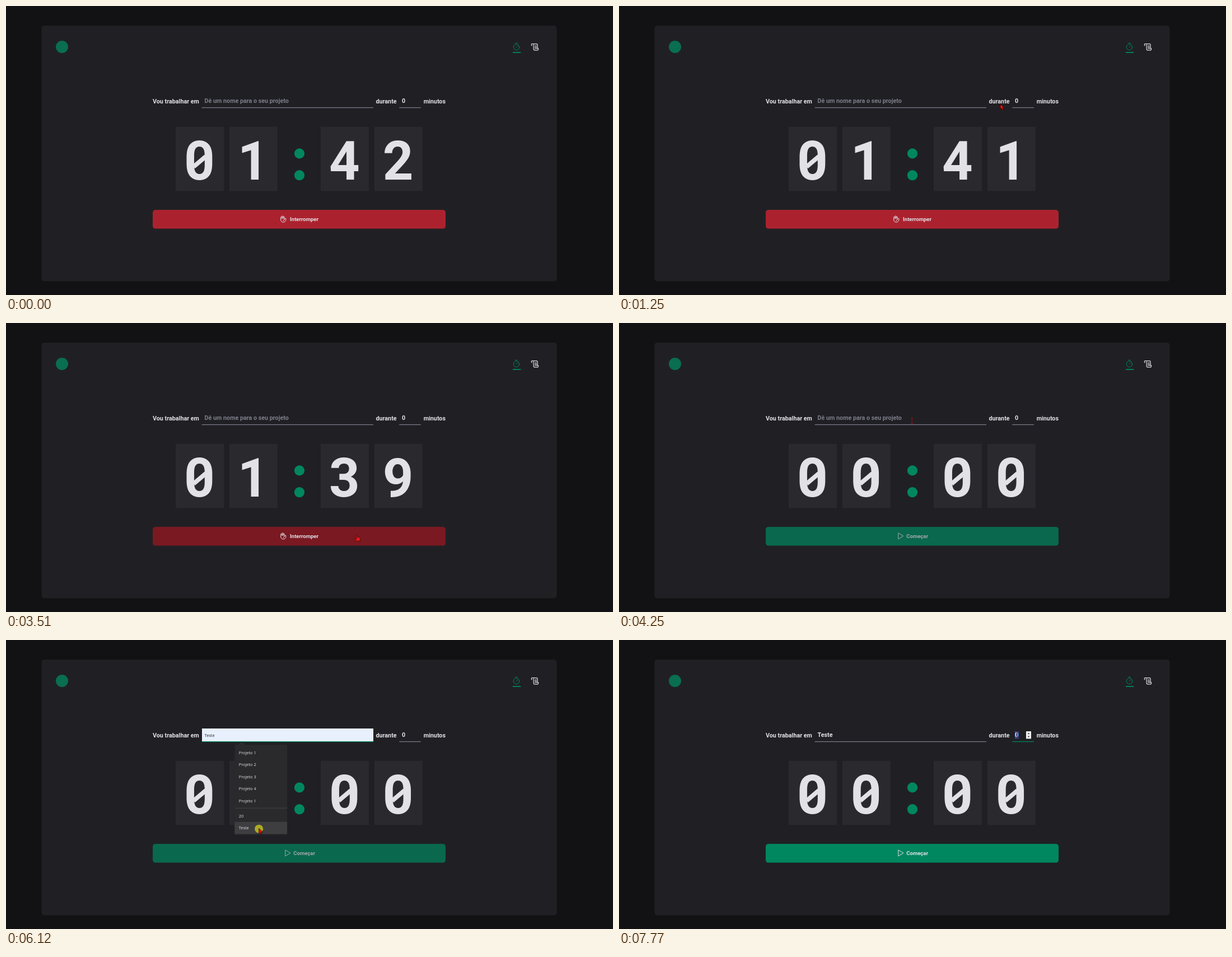
Recreate the animation shown at these times as an HTML page. Size 1084 by 516 pixels, loop 8000 ms.

```html
<!DOCTYPE html>
<html lang="pt-BR">
<meta charset="utf-8">
<title>Timer</title>
<style>
  html, body { margin: 0; width: 100%; height: 100%; overflow: hidden; background: #121214; }
  svg { display: block; width: 1084px; height: 516px; }
  text { font: 700 10.75px Roboto, sans-serif; fill: #e1e1e6; white-space: pre; }
  .icon { fill: none; stroke: #e1e1e6; stroke-linecap: round; stroke-linejoin: round; }
  .button text { font-size: 9.55px; }
  .digit text { font-size: 95.5px; text-anchor: middle; }
  .small text { font: 400 7.4px "Open Sans", sans-serif; }
</style>
<svg viewBox="0 0 1084 516">
  <rect x="63.5" y="35" width="920" height="456.5" rx="4.8" fill="#202024"/>
  <circle cx="100" cy="73" r="11" fill="#0a6e50"/>
  <g class="icon" style="stroke:#00875f">
    <circle cx="911.5" cy="73.4" r="5.2"/>
    <path d="M911.5 73.4l2.4-2.4M909.6 66.4h3.8"/>
  </g>
  <rect x="905" y="82" width="14.3" height="1.8" fill="#00875f"/>
  <path class="icon" stroke-width="1.2" d="M939.3 70.8a1.7 1.7 0 0 1 1.2-3.2h7q1.6 0 1.6 1.6v6.3M942.2 69v8.2q0 1.7 1.8 1.7h5.6q1.5-1 1-3.2h-6M944.5 71h2.8m-2.8 2.3h2.8"/>

  <text x="262" y="173.8">Vou trabalhar em</text>
  <text x="660.5" y="173.8">durante</text>
  <text x="745.7" y="173.8">minutos</text>
  <text id="name" x="354.6" y="173.1"></text>
  <g id="preview" class="small">
    <rect x="350" y="158" width="306" height="23.5" fill="#e8f0fe"/>
    <text id="previewText" x="354.6" y="172.6" style="fill:#222"></text>
  </g>
  <rect id="nameLine" x="349.7" y="180.9" width="306.3" height="1.2"/>
  <rect id="selection" x="706.8" y="163" width="7" height="13" fill="#1c55b0"/>
  <text x="707" y="173.1">0</text>
  <rect id="minutesLine" x="702.3" y="180.9" width="38.6" height="1.2"/>
  <g id="spinner">
    <rect x="727" y="163" width="9" height="13.3" fill="#f1f1f1"/>
    <path d="M729.5 168l2-2.5 2 2.5zm0 3.5l2 2.5 2-2.5z" fill="#444"/>
  </g>

  <g id="clock"></g>
  <g fill="#00875f"><circle cx="524" cy="263.4" r="9.1"/><circle cx="524" cy="302.2" r="9.1"/></g>

  <g id="stop" class="button">
    <rect id="stopFace" x="262" y="364" width="523" height="33.6" rx="4.8"/>
    <path class="icon" d="M490.6 381.5v-4.6q1.1-1.6 2.2 0v3-4.4q1.1-1.6 2.2 0v4-2.8q1.1-1.6 2.2 0v5q-2 .4-2.2 2M497.2 380.5q1-2 2.6-1v2a4.6 4.6 0 0 1-9.2 0"/>
    <text x="507" y="384">Interromper</text>
  </g>
  <g id="start" class="button">
    <rect x="262" y="364" width="523" height="33.6" rx="4.8" fill="#00875f"/>
    <path class="icon" d="M498.8 375.3v10.6l8.8-5.3z"/>
    <text x="513.3" y="384">Começar</text>
  </g>

  <g id="menu" class="small">
    <path d="M408.3 187.3h6.2l6.5-6 6.5 6h74.5v160.5h-93.7z" fill="#2a2a2d"/>
    <rect id="menuHover" x="408.3" width="93.7" height="21.6" fill="#3e3e40"/>
    <path d="M408.3 300.2h93.7" stroke="#444447"/>
  </g>

  <g id="pointer">
    <circle id="click" r="7.5" cy="1" fill="#d8d81c" opacity=".7"/>
    <path id="arrow" d="M0 0V9.2L2 7.4 3.6 11 5.4 10.2 3.9 6.8H6.8Z" fill="#e8150f" stroke="#180404" stroke-width=".7"/>
    <path id="hand" d="M-1 .8Q0-.6 1 .8V4.2Q6 4.5 5.8 7L5 11.5H-1L-4 7.6Q-4 6-1 7.4Z" fill="#e0181a" stroke="#3a0508" stroke-width=".7"/>
    <path id="beam" d="M-2.5-5h5M0-5V5M-2.5 5h5" stroke="#8a1220" stroke-width="1.2"/>
  </g>
</svg>
<script>
const $ = id => document.getElementById(id);
const LOOP = 8000, STOPPED = 3990, FOCUS = 4560, FILLED = 6190, MINUTES = 6980, SELECTED = 7700;
const GREEN = '#00875f', GRAY = '#7c7c8a', WHITE = '#e1e1e6';

// Pointer way points: time, x, y
const path = [
  [260, 1019, 504], [600, 745, 394], [1060, 618, 158], [1250, 681, 175],
  [1850, 539, 296], [2310, 715, 398], [2385, 765, 430], [2850, 1040, 514],
  [3110, 1036, 510], [3510, 627, 378], [3990, 606, 376], [4250, 523.5, 175],
  [FOCUS, 447, 172], [5600, 452, 318], [6100, 452, 337], [6580, 385, 175], [6840, 711, 169]
];

const items = ['Projeto 1', 'Projeto 2', 'Projeto 3', 'Projeto 4', 'Projeto 1', '20', 'Teste']
  .map((label, i) => ({ label, y: 201 + i * 21.5 + (i > 4 ? 5.5 : 0) }));
for (const { label, y } of items)
  $('menu').insertAdjacentHTML('beforeend', `<text x="415.7" y="${y + 2.7}">${label}</text>`);

$('clock').innerHTML = [-177.4, -81.6, 81.6, 177.4].map(dx => `
  <g class="digit" transform="translate(${523.4 + dx} 0)">
    <rect x="-43" y="215.7" width="86" height="114.6" fill="#29292e"/>
    <text x="-.7" y="310.2"></text>
    <path d="M-11 287L11 268.5" stroke="${WHITE}" stroke-width="8"/>
  </g>`).join('');
const digits = [...document.querySelectorAll('.digit')];

const show = (id, on) => $(id).style.display = on ? '' : 'none';
const fill = (id, color) => $(id).style.fill = color;
const within = (t, from, to) => t >= from && t < to;
const inBox = ([x, y], left, top, right, bottom) => x >= left && x <= right && y >= top && y <= bottom;
const overButton = p => inBox(p, 262, 364, 785, 398);
const overName = p => inBox(p, 350, 158, 656, 182);
const overMinutes = p => inBox(p, 702, 158, 741, 182);

// Slope of one axis at a way point; zero at turning points, so nothing overshoots
function slope(i, axis) {
  if (i <= 0 || i >= path.length - 1) return 0;
  const rate = k => (path[k + 1][axis] - path[k][axis]) / (path[k + 1][0] - path[k][0]);
  const a = rate(i - 1), b = rate(i);
  return a * b > 0 ? 2 * a * b / (a + b) : 0;
}

function pointerAt(t) {
  const next = path.findIndex(p => p[0] > t);
  if (next < 1) return path.at(next).slice(1);
  const from = path[next - 1], to = path[next], span = to[0] - from[0], k = (t - from[0]) / span;
  return [1, 2].map(axis =>
    from[axis] + (to[axis] - from[axis]) * k * k * (3 - 2 * k)
    + span * k * (1 - k) * (slope(next - 1, axis) * (1 - k) - slope(next, axis) * k));
}

// Linear 100 ms colour transition: the share of recent time spent hovering
function hoverLevel(t) {
  let hits = 0;
  for (let ago = 0; ago < 100; ago += 5) hits += overButton(pointerAt(t - ago));
  return hits / 20;
}

function drawClock(t) {
  const seconds = 42 - Math.floor((t + 400) / 1000);
  const value = t < STOPPED ? '01' + seconds : '0000';
  digits.forEach((digit, i) => {
    const [, text, slash] = digit.children;
    text.textContent = value[i];
    slash.style.display = value[i] === '0' ? '' : 'none';
  });
}

function drawForm(t, pointer) {
  const menuOpen = within(t, FOCUS, FILLED), filled = t >= FILLED;
  const hovered = menuOpen && pointer[1] > 189 && items.find(item => pointer[1] < item.y + 10.8);
  show('menu', menuOpen);
  show('menuHover', hovered);
  show('preview', hovered);
  if (hovered) {
    $('menuHover').setAttribute('y', hovered.y - 10.8);
    $('previewText').textContent = hovered.label;
  }
  $('name').textContent = filled ? 'Teste' : 'Dê um nome para o seu projeto';
  fill('name', filled ? WHITE : GRAY);
  fill('nameLine', within(t, FOCUS, MINUTES) ? GREEN : GRAY);
  fill('minutesLine', t >= MINUTES ? GREEN : GRAY);
  show('selection', t >= SELECTED);
  show('spinner', overMinutes(pointer));

  const level = hoverLevel(t), mix = (a, b) => a + (b - a) * level;
  show('stop', t < STOPPED);
  show('start', t >= STOPPED);
  fill('stopFace', `rgb(${mix(171, 122)},${mix(34, 25)},${mix(46, 33)})`);
  $('start').style.opacity = filled ? 1 : .7;
}

function drawPointer(t, pointer) {
  const beam = overName(pointer) || overMinutes(pointer);
  const hand = overButton(pointer) && t < STOPPED;
  show('pointer', t >= 260 && !within(t, 2850, 3110));
  $('pointer').setAttribute('transform', `translate(${pointer})`);
  show('beam', beam);
  show('hand', hand);
  show('arrow', !beam && !hand);
  show('click', [STOPPED, FOCUS, FILLED, MINUTES].some(at => within(t, at - 100, at)));
}

function draw() {
  const t = performance.now() % LOOP, pointer = pointerAt(t);
  drawClock(t);
  drawForm(t, pointer);
  drawPointer(t, pointer);
  requestAnimationFrame(draw);
}
draw();
</script>
</html>
```
